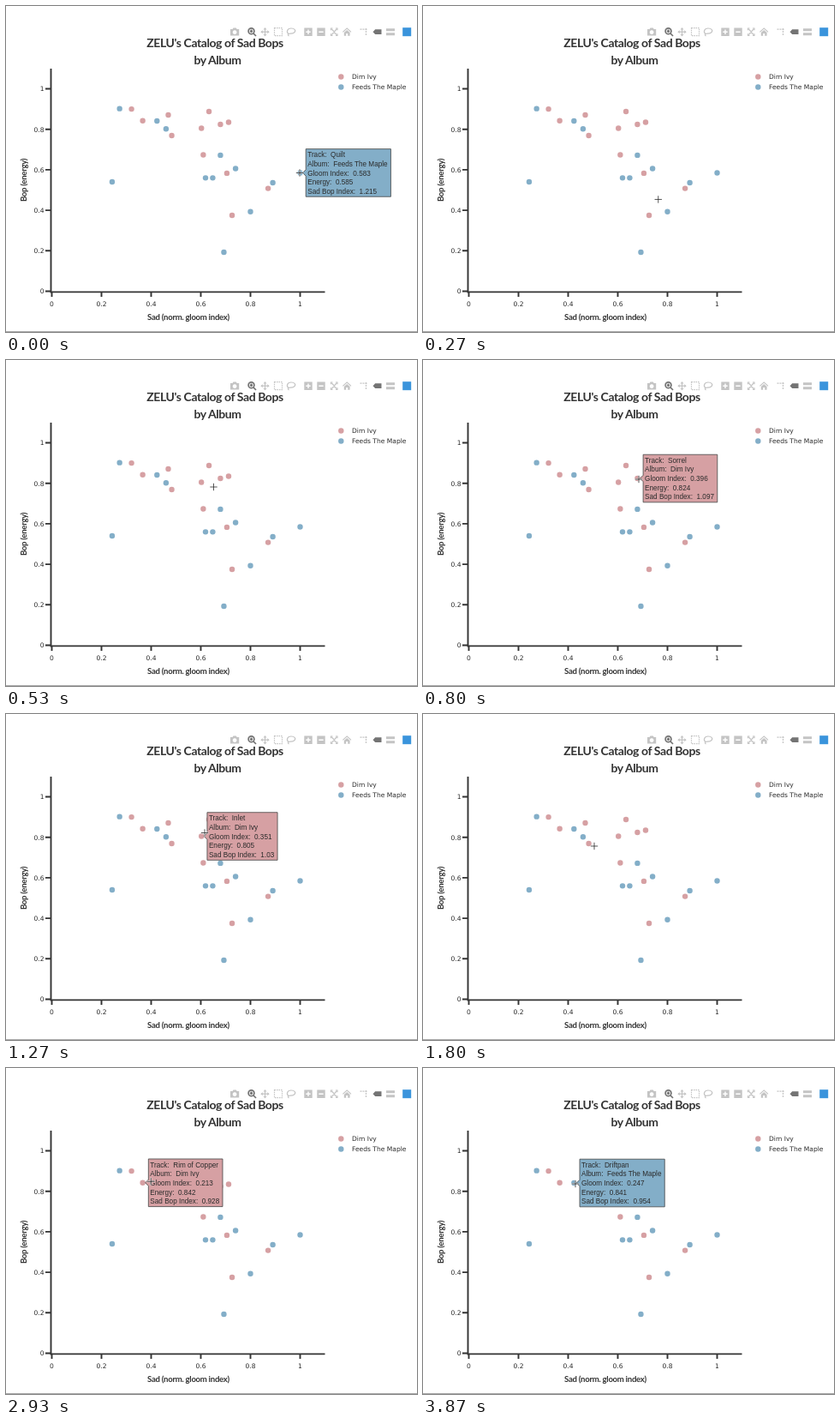
An HTML page for the animation above (3990 ms loop, 480 by 380 pixels).

```html
<!DOCTYPE html>
<html lang="en">
<head>
<meta charset="utf-8">
<title>Sad bops scatter</title>
<style>
  html, body { margin: 0; width: 100%; height: 100%; overflow: hidden; background: #fff; }
  svg { display: block; width: 480px; height: 380px; }
  text { white-space: pre; fill: #333; }
  .head { font: 700 14px Lato, "Open Sans", sans-serif; letter-spacing: -.03em; text-anchor: middle; }
  .small { font-size: 9.6px; }
  .tick { font: 7.56px "DejaVu Sans", sans-serif; fill: #2a2a2a; }
  .tip text { font: 8.19px "Liberation Sans", sans-serif; fill: #2b2b2b; }
  .tip path { stroke: #444; stroke-width: .8; }
  .axis { stroke: #333; stroke-width: 1.9; fill: none; }
  .icons { fill: #c4c4c4; }
  .icons .line { fill: none; stroke: #c4c4c4; stroke-width: 1.2; }
  .icons .on { fill: #747474; }
  .icons .on.line { fill: none; stroke: #747474; stroke-width: 1.7; }
</style>
</head>
<body>
<svg viewBox="0 0 480 380">
  <g class="icons">
    <path fill-rule="evenodd" d="M262 27h2.5l1-1.5h3.2l1 1.5h2.5v7.5h-10.2zM267.1 28.2a2.4 2.4 0 1 0 .01 0z"/>
    <circle class="on line" cx="286.5" cy="29.3" r="3.4"/>
    <path class="on line" d="M289 32l3 3M284.8 29.3h3.4M286.5 27.6v3.4"/>
    <path class="line" d="M298.5 30.2h8M302.5 26.2v8"/>
    <path d="M302.5 25l2 2.4h-4zM302.5 35.4l2-2.4h-4zM297.3 30.2l2.4-2v4zM307.7 30.2l-2.4-2v4z"/>
    <rect class="line" x="313.5" y="25.7" width="9" height="9" stroke-dasharray="1.5 1"/>
    <path class="line" d="M330 32.5c-3-2-1.5-6.5 3-6.5s6 3 3.5 5-5 .5-6.5 1.5 0 2 .5 2.5"/>
    <path fill-rule="evenodd" d="M348.3 25.5h9.4v9.4h-9.4zM352.3 27.5v2h-2v1.4h2v2h1.4v-2h2v-1.4h-2v-2z"/>
    <path fill-rule="evenodd" d="M363.3 25.5h9.4v9.4h-9.4zM365.3 29.5v1.4h5.4v-1.4z"/>
    <path class="line" d="M379.5 28.2v-2.2h2M385 26h2v2.2M387 32.2v2.2h-2M381.5 34.4h-2v-2.2M380.5 27l5.5 6.4M386 27l-5.5 6.4"/>
    <path d="M398.2 25.3l5.2 4.7-.8.8-4.4-4-4.4 4-.8-.8zM394.8 31l3.4-3.1 3.4 3.1v3.7h-2.4v-2.6h-2v2.6h-2.4z"/>
    <path class="line" d="M413.5 27.2h6M420.5 29v6" stroke-dasharray="2 1"/>
    <circle cx="420.5" cy="27.2" r="1.1"/>
    <path class="on" d="M428.5 30.2l2.7-2.9h7.3v5.8h-7.3z"/>
    <path d="M444 26.3h10v3h-10zM444 31.3h10v3h-10z"/>
    <rect x="463.2" y="25.2" width="10" height="10" fill="#3a94dc"/>
  </g>
  <text class="head" x="244" y="48">ZELU's Catalog of Sad Bops</text>
  <text class="head" x="247" y="68">by Album</text>
  <text class="head small" x="213" y="366">Sad (norm. gloom index)</text>
  <text class="head small" transform="translate(24 203) rotate(-90)">Bop (energy)</text>
  <path d="M0 379.5H480" stroke="#a5a5a5"/>
  <path class="axis" d="M52.5 73V334.4M51.6 333.4H372.5"/>
  <g id="ticks"></g>
  <g id="dots"></g>
  <g id="legend"></g>
  <g id="tips"></g>
  <g id="cursor" fill="none">
    <path d="M-4.5 0H4.5M0-4.5V4.5" stroke="#fff" stroke-width="2" stroke-opacity=".7"/>
    <path d="M-4.2 0H4.2M0-4.2V4.2" stroke="#222" stroke-width=".75"/>
  </g>
</svg>
<script>
const LOOP = 3990, TICK = 200 / 3, REACH = 12;
const $ = id => document.getElementById(id);

function add(parent, tag, attrs, label) {
  const el = document.createElementNS('http://www.w3.org/2000/svg', tag);
  for (const k in attrs) el.setAttribute(k, attrs[k]);
  if (label !== undefined) el.textContent = label;
  return parent.appendChild(el);
}
const px = v => 53.5 + 290 * v;
const py = v => 332.5 - 236 * v;
const dot = (parent, x, y, fill) => add(parent, 'circle', { cx: x, cy: y, r: 3.2, fill });

for (let i = 0; i <= 5; i++) {
  const v = i / 5, x = px(v), y = py(v);
  add($('ticks'), 'path', { class: 'axis', d: `M46 ${y}H52M${x} 334V339` });
  add($('ticks'), 'text', { class: 'tick', x: 44.5, y: y + 2.8, 'text-anchor': 'end' }, v);
  add($('ticks'), 'text', { class: 'tick', x, y: 350, 'text-anchor': 'middle' }, v);
}

// Songs: normalised gloom, energy, track
const albums = [
  { name: 'Dim Ivy', fill: '#d6a0a3', songs: [
    [.321, .9, 'Gravel'], [.366, .842, 'Rim of Copper'], [.469, .871, 'Thicket'],
    [.483, .769, 'Pewter'], [.633, .888, 'Lanyard'], [.6025, .805, 'Inlet'],
    [.679, .824, 'Sorrel'], [.712, .835, 'Bobbin'], [.61, .674, 'Spool'],
    [.705, .583, 'Oatfield'], [.871, .508, 'Mortar'], [.726, .375, 'Low Shed']] },
  { name: 'Feeds The Maple', fill: '#83aec8', songs: [
    [.273, .902, 'Plum Gate'], [.4235, .841, 'Driftpan'], [.46, .802, 'Woven'],
    [.243, .54, 'Tin Cup'], [.679, .672, 'Marrow'], [.74, .606, 'Hinge'],
    [.619, .56, 'Wicker'], [.648, .56, 'Damp Roof (Da-Do Tune)'], [.89, .536, 'Tundra Bell'],
    [1, .585, 'Quilt'], [.8, .393, 'Kettle'], [.693, .193, 'Pale Barn']] }
];

function makeTip(x, y, fill, lines) {
  const g = add($('tips'), 'g', { class: 'tip', transform: `translate(${x} ${y})` });
  const box = add(g, 'path', { fill });
  const widths = lines.map((s, i) =>
    add(g, 'text', { x: 8.7, y: -18.2 + i * 10.65 }, s).getComputedTextLength());
  const right = 12.5 + Math.max(...widths);
  box.setAttribute('d', `M3 0L6.7-3.7V-27.8H${right}V27.8H6.7V3.7Z`);
  return g;
}

const spots = albums.flatMap(({ name, fill, songs }, row) => {
  dot($('legend'), 391.3, 82.5 + row * 12, fill);
  add($('legend'), 'text', { class: 'tick', x: 404, y: 85.2 + row * 12 }, name);
  return songs.map(([sad, energy, track]) => {
    const x = px(sad), y = py(energy), gloom = sad * .583;
    const index = Math.hypot(gloom / .5472, energy);
    dot($('dots'), x, y, fill);
    const tip = makeTip(x, y, fill, [`Track:  ${track}`, `Album:  ${name}`,
      `Gloom Index:  ${+gloom.toFixed(3)}`, `Energy:  ${energy}`,
      `Sad Bop Index:  ${+index.toFixed(3)}`]);
    return { x, y, tip };
  });
});

// Pointer stops: time, x, y
const stops = [[0, 343, 194.5], [67, 342, 195], [233, 287, 236], [333, 251, 205],
  [400, 239, 174], [533, 242.5, 148], [800, 252, 139], [1200, 232, 138.5],
  [1600, 232, 138.5], [1800, 200, 154], [1867, 192, 141], [2133, 190, 139],
  [2533, 190, 139], [2867, 165, 131], [3067, 178, 135], [LOOP, 178, 135]];

function pointer(t) {
  const i = Math.max(1, stops.findIndex(s => s[0] >= t));
  const [t0, x0, y0] = stops[i - 1], [t1, x1, y1] = stops[i];
  const k = (t - t0) / (t1 - t0);
  return [x0 + (x1 - x0) * k, y0 + (y1 - y0) * k];
}

// The label follows one tick behind the pointer and picks the nearest dot in reach.
function nearest([x, y]) {
  const gap = s => Math.hypot(s.x - x, s.y - y);
  const best = spots.reduce((a, b) => gap(b) < gap(a) ? b : a);
  return gap(best) < REACH ? best : null;
}

function draw(now) {
  const t = Math.round(Math.floor((now % LOOP + 4) / TICK) * TICK);
  $('cursor').setAttribute('transform', `translate(${pointer(Math.min(t, LOOP))})`);
  const hover = nearest(pointer(Math.max(0, t - TICK)));
  for (const s of spots) s.tip.style.visibility = s === hover ? 'visible' : 'hidden';
}
function frame() {
  draw(performance.now());
  requestAnimationFrame(frame);
}
frame();
</script>
</body>
</html>
```
